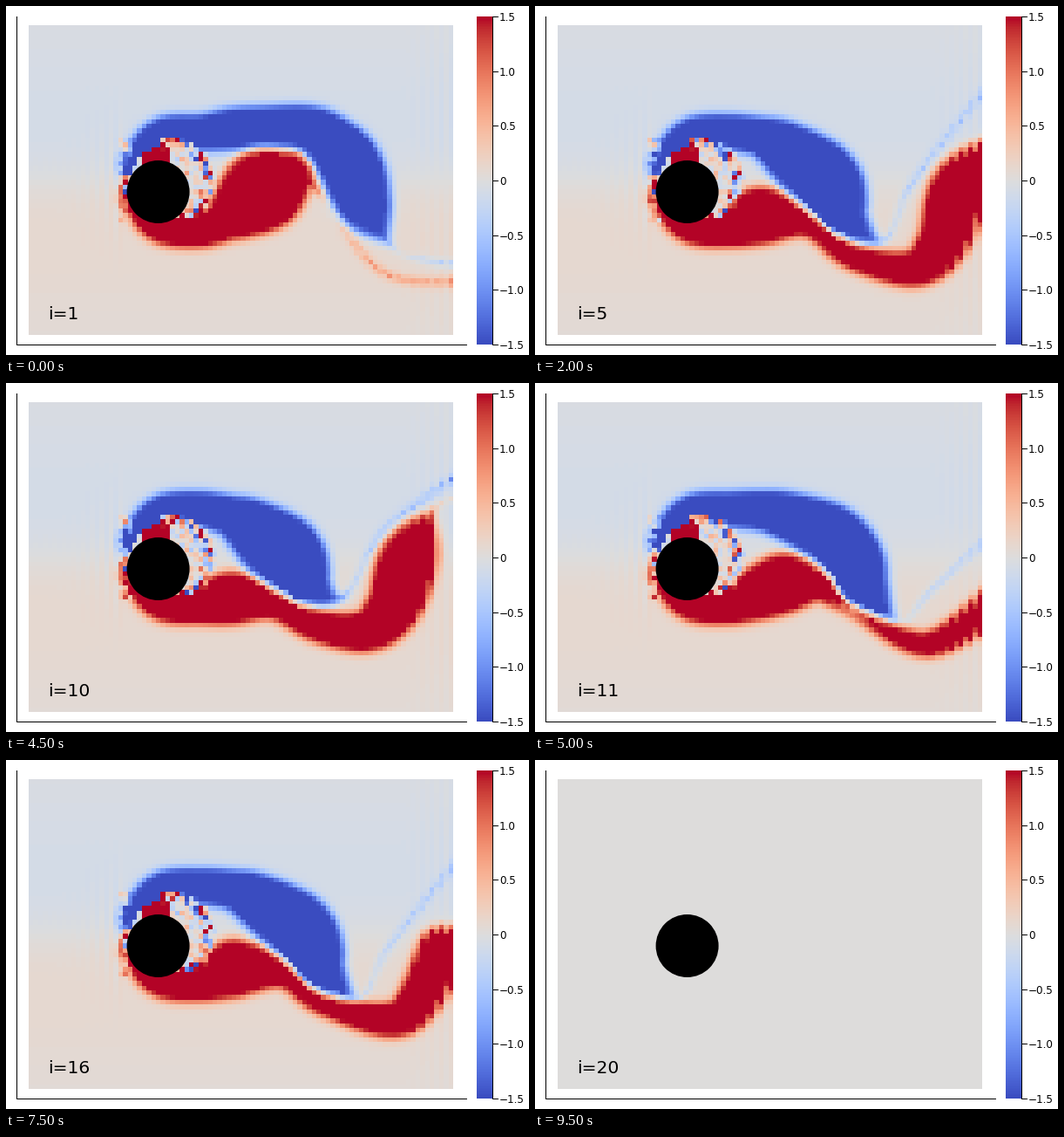
A matplotlib script for the animation above (10000 ms loop, 600x400 px).

```python
import matplotlib.pyplot as plt
import numpy as np
from matplotlib.animation import FuncAnimation
from matplotlib.patches import Circle

W, H, DPI = 600, 400, 100
FRAMES, INTERVAL = 20, 500
COLS, ROWS = 90, 66
LEFT, RIGHT, TOP, BOTTOM = 26, 513, 22, 377
PERIOD = 5.4          # shedding period, in frames
AXIS = 200.5          # mirror line of the wake
STEPS = 14            # samples per chain segment


def catmull_rom(points):
    p = np.vstack([points[:1], points, points[-1:]])
    t = np.linspace(0, 1, STEPS, endpoint=False)[:, None]
    parts = []
    for a, b, c, d in zip(p, p[1:], p[2:], p[3:]):
        parts.append(b + 0.5 * t * (c - a + t * (2*a - 5*b + 4*c - d
                                                + t * (3*(b - c) + d - a))))
    return np.vstack(parts + [points[-1:]])


# Upper shear layer as a chain of discs (x, y, radius); a negative radius
# gives a faint filament. ROOT stays put, the rest drifts through one period.
ROOT = np.array([(143, 182, 5), (162, 157, 9), (185, 145, 12), (225, 145, 14)], float)
ROLL_UP = [(255, 158, 19), (268, 168, 27), (292, 188, 40), (303, 195, 37), (315, 202, 28),
           (328, 208, 18), (362, 186, -6), (440, 92, -7), (590, 90, -4)]
DETACH = [(260, 150, 16), (285, 162, 24), (322, 190, 34), (338, 206, 34), (348, 225, 28),
          (355, 242, 20), (402, 272, -8), (434, 205, -9), (520, 88, -9)]
ARCH = [(260, 141, 17), (295, 139, 17), (345, 141, 20), (370, 155, 25), (395, 183, 30),
        (410, 225, 25), (445, 278, -11), (480, 291, -10), (530, 297, -9)]
SHED = [(258, 161, 27), (314, 152, 9), (365, 113, 8), (435, 98, 14), (470, 128, 22),
        (490, 192, 26), (520, 250, -9), (560, 260, -9), (600, 260, -9)]
# The period opens on the curve it closes with, sampled at other places.
places = np.array([0, 0.15, 0.4, 0.7, 1, 1.25, 2.1, 3.5, 5])
opening = catmull_rom(np.array(SHED, float))[np.rint(places * STEPS).astype(int)]
WAKE = [opening] + [np.array(k, float) for k in (ROLL_UP, DETACH, ARCH, SHED)]

cell_w, cell_h = (RIGHT - LEFT) / COLS, (BOTTOM - TOP) / ROWS
X, Y = np.meshgrid(LEFT + cell_w * (np.arange(COLS) + 0.5),
                   TOP + cell_h * (np.arange(ROWS) + 0.5))
stripes = np.where(np.arange(COLS) % 2, 1.0, -1.0)[None, :]


def shear_layer(phase, y):
    """Strength of the upper layer; phase is counted in frames."""
    k = (phase % PERIOD) / PERIOD * (len(WAKE) - 1)
    n = int(k)
    wake = WAKE[n] + (k - n) * (WAKE[n + 1] - WAKE[n])
    chain = catmull_rom(np.vstack([ROOT, wake]))
    depth = np.full(X.shape, 1e3)
    for cx, cy, r in chain:
        depth = np.minimum(depth, np.hypot(X - cx, y - cy) - r)
    outside = np.exp(-(np.maximum(depth, 0) / 9) ** 2)
    return 1.5 * (outside + np.maximum(-depth, 0) / 4)


def add_body_noise(v, i):
    """Ragged cells on the edge of the cylinder and calm cells inside it."""
    fixed = np.random.default_rng(4).normal(size=X.shape)
    fresh = np.random.default_rng(100 + i).normal(size=X.shape)
    noise = 1.1 * fixed + 0.6 * fresh
    rho = np.hypot(X - 186, Y - AXIS)

    calm = np.where((X > 158) & (X < 190) & (Y < 181), 1.5, 0.12 + 0.18 * noise)
    v = np.where(rho < 42, calm, v)
    ring = np.exp(-((rho - 46) / 5) ** 2) * ((X > 175) | (X < 142)) * (Y < 244)
    v = v * (1 - ring) + 1.3 * noise * ring
    front = np.exp(-((X - 138) / 6) ** 2) * (np.abs(Y - 198) < 48)
    v = v + 0.6 * noise * front

    ahead = (X < 134) * np.exp((X - 134) / 20) * np.exp(-((Y - AXIS) / 55) ** 2)
    return v + 0.14 * stripes * ahead


def vorticity(i):
    if i == FRAMES:
        return np.zeros(X.shape)
    z = (Y - AXIS) / 70
    v = 0.28 * z * np.exp(-np.abs(z))
    v = v + shear_layer(i - 5.05, 2 * AXIS - Y) - shear_layer(i - 7.75, Y)
    outlet = np.clip((X - 455) / 58, 0, 1)
    v = v * (1 + 0.4 * stripes * outlet)
    return np.clip(add_body_noise(v, i), -1.5, 1.5)


fig = plt.figure(figsize=(W / DPI, H / DPI), dpi=DPI, facecolor="white")
ax = fig.add_axes([0, 0, 1, 1])
look = dict(cmap="coolwarm", vmin=-1.5, vmax=1.5, aspect="auto")
field = ax.imshow(vorticity(1), extent=(LEFT, RIGHT, BOTTOM, TOP),
                  interpolation="nearest", **look)
ax.imshow(np.linspace(1.5, -1.5, 256)[:, None], extent=(540, 558, 388, 12), **look)
ax.set(xlim=(0, W), ylim=(H, 0))
ax.axis("off")

ax.add_patch(Circle((174.6, 213), 36, color="black", lw=0))
ax.plot([12, 12, 528], [12, 388, 388], color="black", lw=0.72)
ax.plot([558, 558], [12, 388], color="black", lw=0.72)
for k in range(7):
    value, y = 1.5 - 0.5 * k, 12 + 376 * k / 6
    label = f"{value:.1f}".replace("-", "\u2212") if value else "0"
    ax.plot([558, 563.5], [y, y], color="black", lw=0.72)
    ax.text(566, y, label, size=8.64, va="center_baseline", family="DejaVu Sans")
caption = ax.text(48, 359, "i=1", size=14.6, va="baseline", family="DejaVu Sans")


def update(n):
    field.set_data(vorticity(n + 1))
    caption.set_text(f"i={n + 1}")
    return field, caption


anim = FuncAnimation(fig, update, frames=FRAMES, interval=INTERVAL,
                     repeat=True, repeat_delay=0)
plt.show()
```
